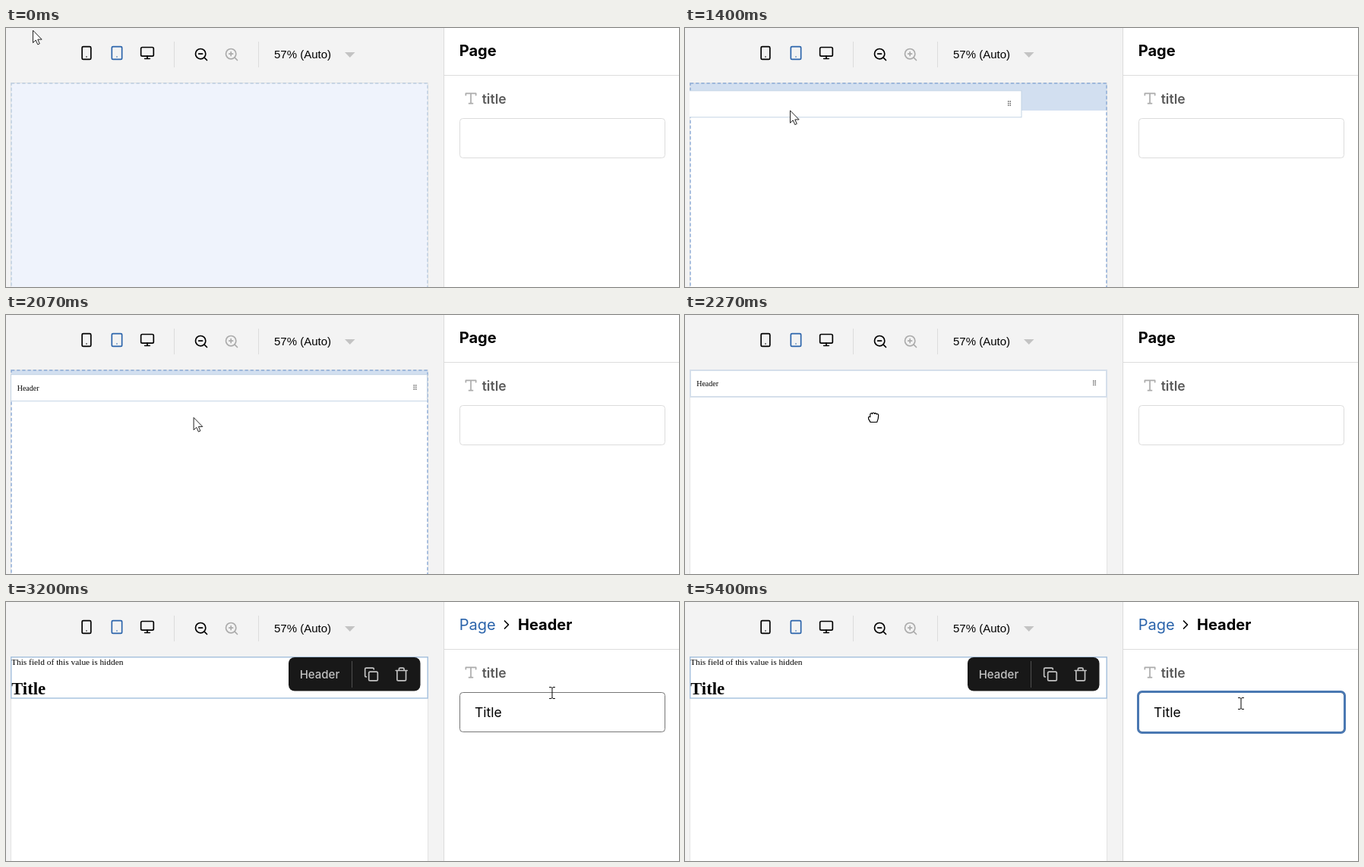
An HTML page that plays this animation: 886 by 342 pixels, repeating every 5.47 s.

```html
<!DOCTYPE html>
<html lang="en">
<head>
<meta charset="utf-8">
<title>Page editor</title>
<style>
html, body { margin: 0; width: 100%; height: 100%; overflow: hidden; background: #f3f3f3; }
svg { display: block; }
text { font-family: Inter, sans-serif; }
.serif text { font-family: "Liberation Serif", serif; }
.icon { fill: none; stroke: currentColor; stroke-width: 2; stroke-linecap: round; stroke-linejoin: round; }
</style>
</head>
<body>
<svg width="886" height="342" viewBox="0 0 886 342">
  <defs>
    <clipPath id="canvasClip"><rect x="6" y="72" width="550" height="270"/></clipPath>
    <g id="dots" fill="#666">
      <circle cx="-2.2" cy="-4.5" r="1.5"/><circle cx="2.2" cy="-4.5" r="1.5"/>
      <circle cx="-2.2" r="1.5"/><circle cx="2.2" r="1.5"/>
      <circle cx="-2.2" cy="4.5" r="1.5"/><circle cx="2.2" cy="4.5" r="1.5"/>
    </g>
  </defs>

  <rect width="886" height="342" fill="#f3f3f3"/>

  <!-- Toolbar -->
  <g class="icon">
    <g transform="translate(96 23) scale(.833)"><rect x="5" y="2" width="14" height="20" rx="2"/><path d="M12 18h.01"/></g>
    <g transform="translate(136 23) scale(.833)" color="#2b64ab"><rect x="4" y="2" width="16" height="20" rx="2" stroke="#2b64ab"/><path d="M12 18h.01" stroke="#2b64ab"/></g>
    <g transform="translate(176 23) scale(.833)"><rect x="2" y="3" width="20" height="14" rx="2"/><path d="M8 21h8M12 17v4"/></g>
    <g transform="translate(247 25) scale(.833)"><circle cx="11" cy="11" r="8"/><path d="M21 21l-4.35-4.35M8 11h6"/></g>
    <g transform="translate(287 25) scale(.833)" style="stroke:#ababab"><circle cx="11" cy="11" r="8"/><path d="M21 21l-4.35-4.35M8 11h6M11 8v6"/></g>
  </g>
  <path d="M221.5 18v34M332.5 18v34" stroke="#dcdcdc"/>
  <text x="353" y="40" style="font:15px 'Liberation Sans',sans-serif">57% (Auto)</text>
  <path d="M446 32h13.5l-6.75 7z" fill="#c3c3c3"/>

  <!-- Canvas -->
  <g class="serif" clip-path="url(#canvasClip)">
    <rect id="sheet" x="6.5" y="72.5" width="549" height="290" stroke="#e3e3e3"/>
    <rect id="gap" x="7" y="73" width="548" height="36" fill="#d2dff0"/>
    <rect id="dashes" x="7" y="73" width="548" height="290" fill="none" stroke-width="1.4" stroke-dasharray="4.3 2.85"/>
    <g id="bar">
      <rect id="barBox" x="7" y="73" width="548" height="35" fill="#fff"/>
      <text x="15.2" y="94" font-size="10">Header</text>
      <use href="#dots" transform="translate(539 89.7) scale(.57)"/>
    </g>
    <g id="block">
      <text x="7" y="83" font-size="11.4">This field of this value is hidden</text>
      <text x="7" y="122" font-size="22.8" font-weight="700">Title</text>
      <rect id="hover" x="7" y="73" width="548" height="54" fill="#8fb3db" opacity=".25"/>
      <rect x="6.8" y="72.8" width="548.4" height="54.2" fill="none" stroke="#a9c3df" stroke-width="1.5"/>
    </g>
  </g>
  <g id="actions" color="#c3c3c3">
    <rect x="372" y="73" width="173.5" height="44.5" rx="8" fill="#181818"/>
    <text x="386.7" y="101" font-size="15" font-weight="500" fill="#c3c3c3">Header</text>
    <path d="M455.5 78v35" stroke="#4f4f4f"/>
    <g class="icon">
      <g transform="translate(471 85.5) scale(.833)"><rect x="8" y="8" width="14" height="14" rx="2"/><path d="M4 16c-1.1 0-2-.9-2-2V4c0-1.1.9-2 2-2h10c1.1 0 2 .9 2 2"/></g>
      <g transform="translate(510.7 85.5) scale(.833)"><path d="M3 6h18M19 6v14c0 1-1 2-2 2H7c-1 0-2-1-2-2V6M8 6V4c0-1 1-2 2-2h4c1 0 2 1 2 2v2"/></g>
    </g>
  </g>
  <g id="drawerItem">
    <rect x=".5" y=".5" width="185" height="61" rx="4" fill="#fff" stroke="#dcdcdc"/>
    <use href="#dots" x="157.5" y="30"/>
  </g>

  <!-- Sidebar -->
  <rect x="577" width="309" height="342" fill="#fff"/>
  <path d="M576.5 0v342M577 62.5h309" stroke="#dcdcdc"/>
  <text id="heading" x="596.7" y="37" font-size="20" font-weight="700">Page</text>
  <g id="crumbs" font-size="20">
    <text x="596.7" y="37" fill="#2b64ab">Page</text>
    <path class="icon" transform="translate(649 20) scale(.833)" d="M9 18l6-6-6-6"/>
    <text x="674" y="37" font-weight="700">Header</text>
  </g>
  <path class="icon" transform="translate(602 83) scale(.833)" style="stroke:#ababab" d="M4 7V4h16v3M9 20h6M12 4v16"/>
  <text x="626.7" y="100" font-size="17.5" font-weight="600" fill="#5a5a5a">title</text>
  <rect id="field" x="597.5" y="119.5" width="270" height="52" rx="4" fill="#fff"/>
  <rect id="focusRing" x="596.5" y="118.5" width="272" height="54" rx="5" fill="none" stroke="#4a78b2" stroke-width="3"/>
  <text id="value" x="617" y="152" font-size="17.5">Title</text>
  <path id="caret" d="M652.5 136v20" stroke="#000"/>

  <!-- Pointers -->
  <g id="pointer" stroke="#222" fill="#fff" stroke-linejoin="round" stroke-linecap="round">
    <path id="arrow" d="M.5.5v16l3.7-3.5 2.6 5.8 2.5-1.1-2.5-5.6h5z"/>
    <path id="fist" stroke="#000" stroke-width="1.2" d="M-4 6.5C-5 4-7 3-6.5.5c.2-1.2 1.5-1.5 2.3-.8V-3.5c0-2 2.3-2.3 2.8-.9C-1.2-6.5 1.2-6.5 1.5-4.6 2.2-6 4-5.5 4-4 5-4.8 6.7-4.2 6.7-2.5 6.7 1.5 6.5 3 4.7 6.5z"/>
    <path id="hand" stroke="#000" d="M-4 8.5C-4.5 6-9 2.5-8.5.5c.5-1.5 2.7-.7 4 1L-6-4.2c-.4-2 2-2.6 2.6-.8l1.1 3.9L-2.2-7c0-2 2.8-2 2.9 0l.3 5.7L2.4-6.6c.4-1.8 3.1-1.4 2.8.5L4.5-.9 6.6-4.2c1-1.5 3.3-.5 2.5 1.2C7.8.5 7.8 3 5.2 8.5z"/>
    <path id="beam" fill="none" stroke="#000" d="M-3.5-7.5h2.5l1 1 1-1h2.5M0-6.5v13M-3.5 7.5h2.5l1-1 1 1h2.5"/>
  </g>
</svg>
<script>
const LOOP = 5470, TICK = 1000 / 15;
const parts = Object.fromEntries([...document.querySelectorAll('svg [id]')].map(el => [el.id, el]));

// Pointer stops: tick, x, y
const stops = [
  [0, 35, 3], [3, 40, -8], [4, -48, 57], [18, -48, 57], [23, 239, 137], [28, 239, 137],
  [32, 248, 135], [39, 248, 135], [40, 256, 120], [48, 719, 120], [51, 732, 134], [99, 732, 134]
];
const smooth = p => p * p * (3 - 2 * p);
const mix = (a, b, p) => a + (b - a) * p;
const show = (id, on) => { parts[id].style.display = on ? '' : 'none'; };
const move = (id, x, y) => parts[id].setAttribute('transform', `translate(${x} ${y})`);
const paint = (id, attr, value) => parts[id].setAttribute(attr, value);

function pointerAt(tick) {
  const i = stops.findIndex(s => s[0] > tick) - 1;
  const [t0, x0, y0] = stops[i], [t1, x1, y1] = stops[i + 1];
  const p = smooth((tick - t0) / (t1 - t0));
  return [mix(x0, x1, p), mix(y0, y1, p)];
}

function draw(time) {
  const tick = Math.floor((time + 4) / TICK);
  const [x, y] = pointerAt(tick);
  const inCanvas = tick >= 18 && x > 7;
  const dropped = tick >= 32;
  const selected = tick >= 36;
  const focused = tick >= 51;

  paint('sheet', 'fill', inCanvas ? '#fff' : '#eff3fc');
  show('dashes', !dropped);
  paint('dashes', 'stroke', inCanvas ? '#8aaad6' : '#bccde0');
  show('gap', inCanvas && !dropped);

  show('drawerItem', tick >= 18 && !inCanvas);
  move('drawerItem', x - 83, y - 45);

  // The bar follows the pointer, then settles into its slot.
  const away = 1 - smooth(Math.min(1, Math.max(0, (tick - 28) / 4)));
  show('bar', inCanvas && !selected);
  move('bar', (x - 250) * away, (y - 99) * away);
  paint('barBox', 'stroke', dropped ? '#d5dfeb' : '#c3d3e4');
  paint('barBox', 'stroke-width', dropped ? 2 : 1);

  for (const id of ['block', 'actions', 'crumbs', 'value']) show(id, selected);
  show('heading', !selected);
  show('hover', tick >= 40 && x < 556);

  const overField = selected && x > 597;
  paint('field', 'stroke', overField ? '#767676' : '#dcdcdc');
  show('focusRing', focused);
  show('caret', focused && Math.floor((tick - 51) / 8) % 2 === 0);

  const shape = overField ? 'beam'
    : tick >= 32 && tick < 40 ? 'fist'
    : tick >= 40 && x < 556 ? 'hand' : 'arrow';
  for (const id of ['arrow', 'fist', 'hand', 'beam']) show(id, id === shape);
  move('pointer', x, y);
}

const start = performance.now();
function frame() {
  draw((performance.now() - start) % LOOP);
  requestAnimationFrame(frame);
}
frame();
</script>
</body>
</html>
```
